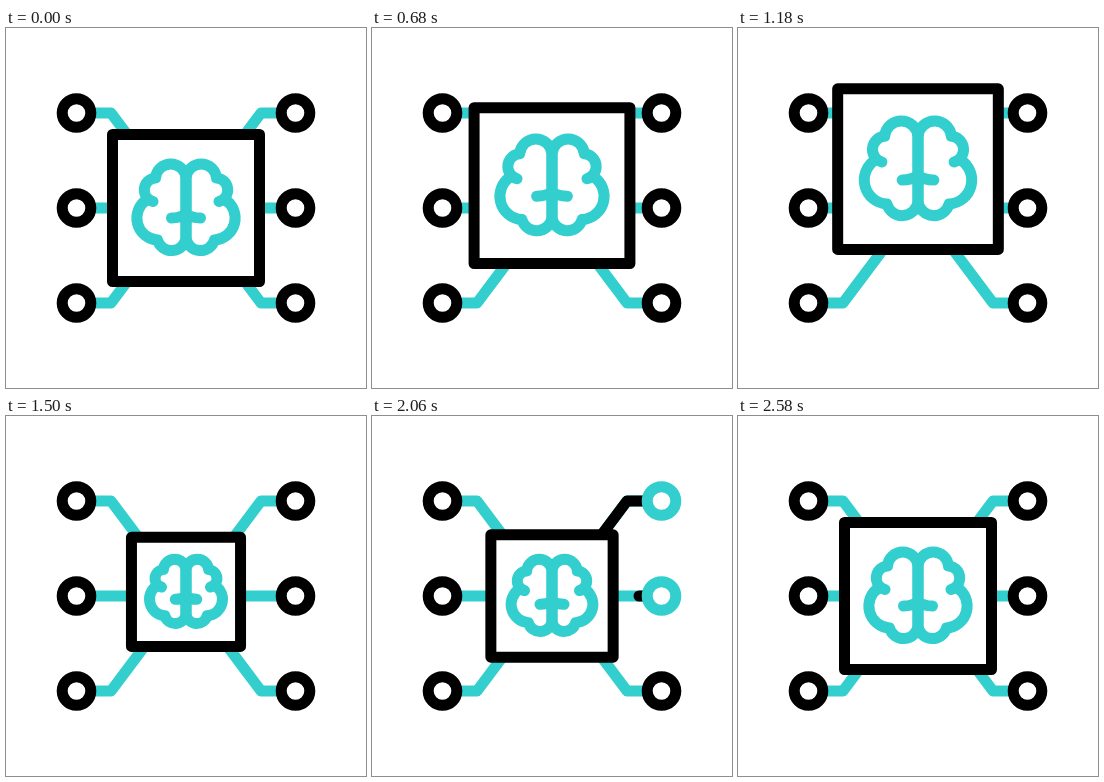
Write an HTML page that moves like this. It is 360x360 px and loops after 3000 ms.

```html
<!DOCTYPE html>
<html lang="en">
<head>
<meta charset="utf-8">
<title>Brain chip</title>
<style>
  html, body { margin: 0; height: 100%; overflow: hidden; background: #fff; }
  svg { display: block; width: 100vw; height: 100vh; }
  path, rect, circle { stroke-linecap: round; stroke-linejoin: round; }
</style>
</head>
<body>
<svg id="stage" viewBox="0 0 360 360" fill="none" stroke-width="11">
  <g id="wires"></g>
  <g id="chip">
    <rect id="frame" fill="#fff" stroke="#000"/>
    <g id="brain" stroke="#33cece">
      <g id="glow" fill="#bfe6e6" stroke="none">
        <ellipse cx="20" cy="-17" rx="18" ry="16"/>
        <circle cx="-24" cy="-14" r="9"/>
      </g>
      <path id="half" d="M0 30V-30A15.3 15.3 0 0 0 -30.5 -30A12 12 0 0 0 -33 -6.5
        M-39 -8.5A22 22 0 0 0 -28.5 32A14.6 14.6 0 0 0 0 30M0 6Q-6 10 -14.5 10"/>
      <use href="#half" transform="scale(-1 1)"/>
    </g>
  </g>
  <g id="nodes"></g>
</svg>
<script>
const LOOP = 3000, TEAL = '#33cece', BLACK = '#000';
const REST_HALF = 73.5;
const $ = id => document.getElementById(id);

function add(parent, tag, attrs) {
  const el = document.createElementNS('http://www.w3.org/2000/svg', tag);
  for (const key in attrs) el.setAttribute(key, attrs[key]);
  return parent.appendChild(el);
}

const progress = (t, from, to) => Math.min(1, Math.max(0, (t - from) / (to - from)));
const ease = (t, from, to) => (1 - Math.cos(Math.PI * progress(t, from, to))) / 2;

// Each wire runs from its node to the chip, drawn for the left side and mirrored for the right.
const rows = [
  { y: 85, d: 'M86 85H105L144 137' },
  { y: 180, d: 'M86 180H130' },
  { y: 275, d: 'M86 275H105L144 223' }
];
// Pulse times: head start, head end, tail start, tail end.
const inbound = [1580, 1740, 1880, 2060];
const outbound = [[1920, 2040, 2140, 2250], [1760, 1860, 1960, 2080], [2060, 2180, 2300, 2440]];

const links = [];
for (const right of [false, true]) {
  rows.forEach(({ y, d }, i) => {
    const transform = right ? 'translate(360 0) scale(-1 1)' : 'translate(0 0)';
    add($('wires'), 'path', { d, transform, stroke: TEAL });
    links.push({
      right,
      times: right ? outbound[i] : inbound,
      pulse: add($('wires'), 'path', { d, transform, stroke: BLACK, pathLength: 1 }),
      node: add($('nodes'), 'circle', { cx: 70.5, cy: y, r: 14.3, transform, fill: '#fff' })
    });
  });
}

function drawLink({ right, times, pulse, node }, t) {
  const [headStart, headEnd, tailStart, tailEnd] = times;
  const head = progress(t, headStart, headEnd), tail = progress(t, tailStart, tailEnd);
  const start = right ? 1 - head : tail;
  pulse.style.display = head > tail ? '' : 'none';
  pulse.setAttribute('stroke-dasharray', `${head - tail} 3`);
  pulse.setAttribute('stroke-dashoffset', -start);
  const lit = t >= (right ? headEnd : headStart) && t < tailEnd;
  node.setAttribute('stroke', lit ? TEAL : BLACK);
}

function drawChip(t) {
  const rise = ease(t, 180, 1120), fall = ease(t, 1120, 1600), grow = ease(t, 1780, 2390);
  const half = REST_HALF + 8 * rise - 30 * fall + 22 * grow;
  const scale = half / REST_HALF;
  $('chip').setAttribute('transform', `translate(180 ${180 - 40.5 * (rise - fall)})`);
  for (const key of ['x', 'y']) $('frame').setAttribute(key, -half);
  for (const key of ['width', 'height']) $('frame').setAttribute(key, 2 * half);
  $('brain').setAttribute('transform', `scale(${scale})`);
  $('brain').setAttribute('stroke-width', 11 / scale);
  $('glow').style.display = t >= 1780 && t < 1860 ? '' : 'none';
}

function render(now) {
  const t = now % LOOP;
  drawChip(t);
  links.forEach(link => drawLink(link, t));
  requestAnimationFrame(render);
}
render(0);
</script>
</body>
</html>
```
